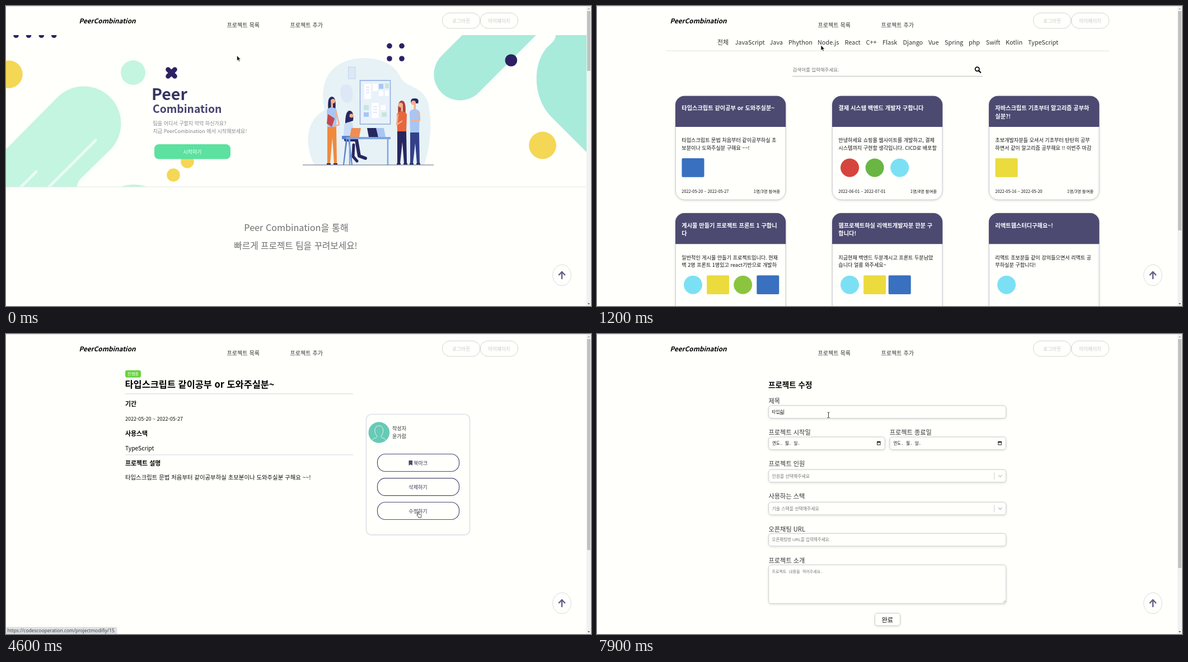
Recreate the animation shown at these times as an HTML page. Size 1045x536 px, loop 8 s.

```html
<!DOCTYPE html>
<html lang="ko">
<head>
<meta charset="utf-8">
<title>PeerCombination</title>
<style>
html, body { margin: 0; width: 100%; height: 100%; overflow: hidden; background: #fffffc; }
svg { display: block; width: 1045px; height: 536px; }
text { font-family: "Noto Sans CJK KR", "Noto Sans CJK JP", "Noto Sans CJK", sans-serif; white-space: pre; }
.field { font-family: "Liberation Sans", "Noto Sans CJK KR", sans-serif; }
.mono { font-family: "Liberation Mono", "Noto Sans CJK KR", monospace; }
.check { font-family: "DejaVu Sans", sans-serif; }
#status text { font-family: "Noto Sans", sans-serif; }
.logo { font-style: italic; font-weight: 700; }
.shadow { filter: drop-shadow(0 1px 2px #0002); }
</style>
</head>
<body>
<svg id="stage" viewBox="0 0 1045 536"></svg>
<script>
const NAVY = '#2d2163', INK = '#4d4a72', MINT = '#c3f5e1', TEAL = '#a8ebda', YELLOW = '#f5d756';
const BG = '#fffffc', DARK = '#27275f', BLUE = '#a9c6f2', SKIN = '#f5b08c';

const text = (x, y, size, str, fill = '#333', more = '') =>
  `<text x="${x}" y="${y}" font-size="${size}" fill="${fill}" ${more}>${str}</text>`;
const circle = (x, y, r, fill, more = '') => `<circle cx="${x}" cy="${y}" r="${r}" fill="${fill}" ${more}/>`;
const rect = (x, y, w, h, fill, more = '') =>
  `<rect x="${x}" y="${y}" width="${w}" height="${h}" fill="${fill}" ${more}/>`;
const path = (d, fill, more = '') => `<path d="${d}" fill="${fill}" ${more}/>`;
const line = (d, stroke, width = 1, more = '') =>
  path(d, 'none', `stroke="${stroke}" stroke-width="${width}" ${more}`);
const group = (id, ...parts) => `<g id="${id}">${parts.join('')}</g>`;
const BOLD = 'font-weight="700"', MEDIUM = 'font-weight="500"', MIDDLE = 'text-anchor="middle"';
const ROUND = 'stroke-linecap="round" stroke-linejoin="round"';

function navigation() {
  const pill = (x, label) => rect(x, 12.3, 67.5, 27.7, 'none', 'rx="13.8" stroke="#cfcfcf" stroke-width=".9"') +
    text(x + 33.8, 30, 8.6, label, '#c9c9c9', `${MIDDLE} ${MEDIUM}`);
  return text(130.5, 31, 11.7, 'PeerCombination', '#000', 'class="logo"') +
    text(394.5, 37.5, 10.1, '프로젝트 목록', '#333', 'id="listLink"') +
    text(507.5, 37.5, 10.1, '프로젝트 추가') + pill(779.3, '로그아웃') + pill(847.2, '마이페이지');
}

function illustration() {
  const note = (x, y, w, h, fill = '#fff') => rect(x, y, w, h, fill);
  // face: -1 looks left, 1 looks right
  const person = (x, y, face, hair, hairLength, top, legs, hip) =>
    path(`M${x - 6} ${y + hairLength}q-3-${hairLength + 6} 6-${hairLength + 6}t6 ${hairLength + 6}z`, hair) +
    rect(x - 1.5, y + 4, 3.5, 12, SKIN) + circle(x + face * 2, y + 2, 4, SKIN) +
    path(`M${x - 9} ${y + 19}q1-5 9-6q8 1 9 6l-1 ${hip - y - 19}h-16z`, top) +
    path(`M${x - 8} ${hip}h16l1 ${281 - hip}h-5l-3-${262 - hip}l-4 ${262 - hip}h-5z`, legs) +
    rect(x - 9, 281, 7, 2.5, DARK) + rect(x + 3, 281, 7, 2.5, DARK);
  return path('M551 284C533 250 534 205 569 186C561 150 568 110 612 97C650 86 692 98 704 126C712 146 742 141 754 172C762 210 758 250 747 284Z', '#e7f2f6') +
    rect(611.5, 109, 12.5, 21, '#dce8f5', 'stroke="#c2d4ee"') + path('M597 152q1-12 11-12t11 12q2 20-9 21t-13-21', '#dce8f5') +
    rect(632.5, 133, 54, 78, '#e9f1fb', 'stroke="#8cabe0" stroke-width="1.5"') +
    note(640, 139, 12, 27) + note(655, 139, 9, 13) + note(666, 139, 8, 9, BLUE) + note(677, 138, 7, 9, '#c3e8dc') +
    note(666, 151, 8, 10) + note(677, 151, 7, 10) + note(653, 173, 13, 27) + note(639, 177, 9, 9, '#c3e8dc') +
    note(669, 177, 9, 9) + note(639, 190, 9, 8, BLUE) + note(671, 190, 9, 8, '#c3e8dc') +
    line('M643 145h6m-6 5h6m-6 5h6m7 25h7m-7 5h7m-7 5h7', '#c3d3ea', 1) +
    person(582, 168, 1, DARK, 20, BLUE, '#f08a3c', 216) + path('M575 193l12 8l-5 15l-9-6z', '#c4484d') +
    line('M590 190l5 22l-9 3', SKIN, 2.5, ROUND) +
    path('M606 210q0-23 8-23q8 1 6 18z', DARK) + circle(617, 196, 3.5, SKIN) +
    path('M604 212q7-7 15-3l3 25h-19z', '#c9dcf7') + line('M607 239h19l5 29l11 4', DARK, 6, ROUND) +
    line('M621 248l-1 21l7 8', DARK, 5, ROUND) + path('M600 232h18v6h-18zM607 238h3l-6 46h-2zM611 238h3l5 46h-2z', '#5d82cf') +
    rect(608, 234, 79, 4, '#7fa4e3') + line('M614 238v46M682 238v46', '#7fa4e3', 2.5) +
    path('M617 218h17l-3 16h-17z', '#ee8e55') + path('M645 218h17l3 16h-17z', DARK) +
    path('M661 218h14l3 16h-13z', BLUE) +
    person(707, 175, -1, '#a9433c', 22, '#e8663e', DARK, 224) + person(730, 171, -1, DARK, 3, BLUE, '#33408a', 226) +
    line('M700 194l-2 18l9-6M738 190l1 14l-13 1', SKIN, 2.5, ROUND) + line('M530 284h234', '#666a80', 1.2);
}

function home() {
  const dots = (xs, y) => xs.map(x => circle(x, y, 4.8, NAVY)).join('');
  return `<clipPath id="heroClip">${rect(0, 52, 1037, 271, '#000')}</clipPath><g clip-path="url(#heroClip)">` +
    dots([18, 40.5, 63.3, 85.7], 52.3) + circle(5, 122, 24.7, YELLOW) + circle(227, 119, 22, MINT) +
    path('M0 256L92 163A66 66 0 0 1 186 257L136 306Q127 314 127 323H0Z', MINT) +
    line('M160 240L74 326M54 296L23 327', '#e8fcf4', 5, ROUND) + circle(228, 387, 68, MINT) +
    line('M289.5 113.5l12 12m0-12l-12 12', NAVY, 8.5, ROUND) +
    circle(324, 278, 11.8, YELLOW) + circle(299, 302, 11.8, YELLOW) +
    dots([685, 707], 71.3) + dots([685, 707], 94) +
    path('M815 52L778 89A46 46 0 0 0 844 155L947 52Z', TEAL) +
    path('M982 52C981 64 971 68 964 77C941 106 941 162 972 196L1037 261V52Z', TEAL) +
    circle(902.3, 97, 10.8, NAVY) + circle(958.5, 249, 24.4, YELLOW) + '</g>' +
    text(260, 168, 28.5, 'Peer', '#35335f', BOLD) + text(262, 191, 19.3, 'Combination', '#45426f', BOLD) +
    text(262.5, 213.3, 9.05, '팀을 어디서 구할지 막막 하신가요?', '#85858f') +
    text(262.5, 226.9, 9.05, '지금 PeerCombination 에서 시작해보세요!', '#85858f') +
    rect(265, 247, 136, 26.5, '#5ce1a0', 'rx="8"') + text(333, 263.8, 9, '시작하기', '#fff', MIDDLE) +
    illustration() + line('M0 323.2h1037', '#dfe5e3', .8) +
    text(518.5, 402, 16.2, 'Peer Combination을 통해', '#707070', `${MIDDLE} font-weight="300"`) +
    text(517.5, 434, 15.7, '빠르게 프로젝트 팀을 꾸려보세요!', '#707070', `${MIDDLE} font-weight="300"`);
}

function filters() {
  const names = { 전체: 215, JavaScript: 246.5, Java: 308.5, Phython: 342, 'Node.js': 394, React: 442.5, 'C++': 480.5,
    Flask: 510, Django: 546.5, Vue: 592, Spring: 621, php: 664, Swift: 694.7, Kotlin: 730, TypeScript: 770 };
  return Object.entries(names).map(([name, x]) => text(x, 69, 10.85, name)).join('') +
    line('M123 80.3h792', '#ebebe9', 1.4) +
    text(349.5, 117.4, 8.5, '검색어를 입력해주세요.', '#777') + line('M349 125.5h340', '#bbb') +
    circle(679.2, 112.8, 3.6, 'none', 'stroke="#000" stroke-width="1.8"') + line('M682 115.6l3.2 3.2', '#000', 2.2, ROUND);
}

const badges = {
  ts: ['#3970bf', true], js: ['#ecdb3d', true], java: ['#d5453d'], spring: ['#6ab644'], react: ['#7ce0f4'], node: ['#8bc53f']
};
const posts = [
  ['타입스크립트 같이공부 or 도와주실분~', '', '타입스크립트 문법 처음부터 같이공부하실 초', '보분이나 도와주실분 구해요 ~~!', 'ts', '2022-05-20 ~ 2022-05-27', '1명/3명'],
  ['결제 시스템 백엔드 개발자 구합니다', '', '안녕하세요 쇼핑몰 웹사이트를 개발하고, 결제', '시스템까지 구현할 생각입니다. CICD로 배포할', 'java spring react', '2022-06-01 ~ 2022-07-01', '1명/4명'],
  ['자바스크립트 기초부터 알고리즘 공부하', '실분?!', '초보개발자분들 오셔서 기초부터 탄탄히 공부', '하면서 같이 알고리즘 공부해요 !! 이번주 마감', 'js', '2022-05-16 ~ 2022-05-20', '1명/3명'],
  ['게시물 만들기 프로젝트 프론트 1 구합니', '다', '일반적인 게시물 만들기 프로젝트입니다. 현재', '백 2명 프론트 1명있고 react기반으로 개발하', 'react js node ts', '2022-05-20 ~ 2022-06-20', '3명/4명'],
  ['웹프로젝트하실 리액트개발자분 한분 구', '합니다!', '지금현재 백엔드 두분계시고 프론트 두분남았', '습니다 얼릉 와주세요~', 'react js ts', '2022-05-20 ~ 2022-06-20', '4명/5명'],
  ['리액트웹스터디구해요~!', '', '리액트 초보분들 같이 강의들으면서 리액트 공', '부하실분 구합니다!', 'react', '2022-05-20 ~ 2022-06-20', '1명/4명']
];

function card([title, title2, body, body2, stack, dates, members], i) {
  const icons = stack.split(' ').map((name, k) => {
    const [color, square] = badges[name], x = 11.5 + k * 44.6;
    return square ? rect(x, 111.3, 40, 33.7, color, 'rx="2"') : circle(x + 20, 128.2, 16.5, color);
  });
  return `<g transform="translate(${140 + i % 3 * 280} ${160.7 + Math.floor(i / 3) * 209.3})">` +
    rect(.3, .3, 196.6, 185.3, BG, 'rx="16" stroke="#c5c5cc" stroke-width=".9" class="shadow"') +
    path('M0 55.3V16a16 16 0 0 1 16-16h165.2a16 16 0 0 1 16 16v39.3z', INK) +
    text(11.3, 25.6, 10.2, title, '#fff', BOLD) + text(11.3, 40.4, 10.2, title2, '#fff', BOLD) +
    text(11.3, 82.8, 9.1, body, '#111') + text(11.3, 96.3, 9.1, body2, '#111') + icons.join('') +
    text(11.3, 173.3, 7.4, dates, '#111') +
    text(187, 173.3, 7.4, members + ' 참여중', '#111', 'text-anchor="end"') + '</g>';
}

function footer() {
  const head = (x, label) => text(x, 184.3, 11.4, label, '#222', MEDIUM);
  const item = (x, y, label) => text(x, y, 9.8, label);
  const check = y => text(691.5, y, 13, '✔', '#333', 'class="check"');
  return text(244, 225, 11.7, 'PeerCombination', '#000', 'class="logo"') +
    head(428, 'REFERENCE') + item(428, 211, 'Designed by') + item(428, 225.5, 'Drawpom') +
    head(560, 'ABOUT US') + item(560, 211, 'Repository') + item(560, 231, 'Wiki') +
    head(692, 'TEAM MEMBER') + check(212) + item(704, 211, 'Front') + item(691.7, 231, '최다온') +
    item(725.5, 231, '윤가람') + check(252.5) + item(704, 251.5, 'Back') + item(691.7, 271.7, '남도율');
}

function detail() {
  const button = (y, label, x = 736) => rect(663.5, y, 146, 31, 'none', `rx="14" stroke="${INK}" stroke-width="1.2"`) +
    text(x, y + 19, 9.1, label, '#3b3958', MIDDLE);
  return rect(213, 64.7, 28, 13, '#67d33f', 'rx="3.5"') + text(227, 74, 7.3, '진행중', '#fff', MIDDLE) +
    text(212.5, 96, 16.4, '타입스크립트 같이공부 or 도와주실분~', '#000', BOLD) +
    line('M213 106.8h407M213 215.8h407', '#dcdde6', 1.3) +
    text(213, 128.7, 10.9, '기간', '#000', BOLD) + text(213, 154.8, 9.05, '2022-05-20 ~ 2022-05-27', '#111') +
    text(213, 182.2, 10.9, '사용스택', '#000', BOLD) + text(213, 208, 10.3, 'TypeScript', '#000', MEDIUM) +
    text(213, 235, 10.9, '프로젝트 설명', '#000', BOLD) +
    text(213, 259.5, 10.4, '타입스크립트 문법 처음부터 같이공부하실 초보분이나 도와주실분 구해요 ~~!', '#111') +
    rect(643.5, 143.5, 185, 215.3, 'none', 'rx="9" stroke="#dfe0e9" stroke-width="1.7"') +
    circle(666.3, 176, 18.8, '#67cab5') +
    line('M655 190c0-5 8-3 8-8c-6-4-6-18 3.3-18s9 14 3.5 18c0 5 8 3 8 8', '#e4f6f1', 1) +
    text(690, 172, 9.05, '작성자') + text(690, 185.5, 9.05, '윤가람') +
    path('M719.5 226h6.5v9l-3.25-2l-3.25 2z', INK) +
    button(214.5, '북마크', 740.7) + button(257.7, '삭제하기') + button(300.5, '수정하기');
}

function form() {
  const label = (x, y, str) => text(x, y, 11.2, str);
  const box = (x, y, w, h = 22.5) => rect(x, y, w, h, BG, 'rx="4.5" stroke="#c9c9c9" stroke-width=".9" class="shadow"');
  const hint = (y, str, size = 7.5, cls = 'field') => text(312.5, y, size, str, '#777', `class="${cls}"`);
  const date = x => box(x, 184, 207.5) + text(x + 6.2, 198, 7.5, '연도.', '#111', 'class="mono"') +
    text(x + 29, 198, 7.5, '월.', '#111', 'class="mono"') + text(x + 44.7, 198, 7.5, '일.', '#111', 'class="mono"') +
    rect(x + 193.8, 192.3, 5.5, 5.7, 'none', 'stroke="#111" stroke-width=".9"') + rect(x + 193.5, 192, 6, 2, '#111');
  const select = (y, str) => box(306.7, y, 424) + hint(y + 14.5, str, 7.9) +
    line(`M709.7 ${y + 5}v13`, '#ccc') + line(`M717.2 ${y + 10}l3 3l3-3`, '#bbb', 1.2, ROUND);
  return text(306, 96, 13.5, '프로젝트 수정', '#000', BOLD) +
    label(306.5, 123.7, '제목') + box(306.7, 128, 424) + `<g id="title"></g>` +
    label(306.5, 179.8, '프로젝트 시작일') + date(306.7) + label(522.7, 179.8, '프로젝트 종료일') + date(523) +
    label(306.5, 236, '프로젝트 인원') + select(242.3, '인원을 선택해주세요') +
    label(306.5, 294.3, '사용하는 스택') + select(300.5, '기술 스택을 선택해주세요') +
    label(306.5, 352.5, '오픈채팅 URL') + box(306.7, 356.4, 424) + hint(370, '오픈채팅방 URL을 입력해주세요.') +
    label(306.5, 408.6, '프로젝트 소개') + box(306.7, 412.6, 424, 69) + hint(426.7, '프로젝트 내용을 적어주세요.', 7.1, 'mono') +
    line('M725.5 480l4-4m-1.5 4l1.5-1.5', '#777', .7) +
    box(496.5, 499, 45, 22) + text(518.8, 514.5, 11.2, '완료', '#111', `${MIDDLE} ${MEDIUM}`);
}

const scrollbar = rect(1037, 1, 8, 535, '#f1f1f1') + rect(1038, 9, 6, 1, '#c1c1c1', 'id="thumb"') +
  path('M1039 6h4l-2-2.5z', '#a3a3a3') + path('M1039 531h4l-2 2.5z', '#505050');

const cursors =
  group('arrow', path('M0 0v9.5l2.2-2l1.5 3.3l1.5-.7l-1.5-3.2h3z', '#111', 'stroke="#fff" stroke-width=".6"')) +
  group('hand', path('M2.5 6V1.2q1-1.2 1.8 0V4.5l4 .9q1 .3.8 1.5l-.6 2.6v1.3h-4.6v-1.2l-3.3-3.6q.4-1.1 1.9 0z', '#fff',
    'stroke="#222" stroke-width=".8" stroke-linejoin="round"')) +
  group('beam', line('M-2-4.7h1.5l.5.5l.5-.5h1.5M0-4.2v8.4M-2 4.7h1.5l.5-.5l.5.5h1.5', '#222', .9));

document.getElementById('stage').innerHTML = rect(0, 0, 1045, 536, BG) +
  group('home', home()) +
  group('list', filters(), group('cards', ...posts.map(card)), group('footer', footer())) +
  group('detail', detail()) + group('form', form()) + group('nav', navigation()) +
  group('up', `<ellipse cx="993" cy="481" rx="16.3" ry="18.7" fill="${BG}" stroke="#dadae2"/>`,
    line('M993 488v-13m-5.8 6l5.8-6l5.8 6', '#625f86', 2.4)) +
  group('scroll', scrollbar) + rect(0, 0, 1045, 1, '#dfe1df') +
  group('status', rect(-2, 524, 1, 14, '#dee1e3', 'rx="2" id="statusBox" stroke="#cfd2d4" stroke-width=".6"'),
    text(2.5, 533.2, 8.4, '', '#444', 'id="statusText"')) + group('cursor', cursors);

const $ = id => document.getElementById(id);
const show = (id, on) => { $(id).style.display = on ? '' : 'none'; };
const shift = (id, x, y = 0) => $(id).setAttribute('transform', `translate(${x} ${y})`);
const at = (steps, t) => steps.filter(step => step[0] <= t).pop();

// time, x, y, pointer
const route = [
  [0, 412.5, 88.5, 'arrow'], [200, 480, 79, 'arrow'], [300, 517, 64, 'arrow'], [400, 503, 53, 'arrow'], [500, 470, 45, 'arrow'],
  [600, 446, 36, 'hand'], [800, 427, 31.5, 'hand'], [1000, 427, 31.5, 'hand'], [1200, 400, 70, 'arrow'], [1500, 330, 165, 'arrow'],
  [1700, 298, 218, 'hand'], [1800, 294.5, 220.5, 'hand'], [1900, 291.5, 223, 'hand'], [2100, 291.5, 223, 'hand'],
  [2200, 291.5, 224.5, 'hand'], [2300, 294.5, 225, 'arrow'], [2400, 294.5, 225, 'arrow'], [2900, 712, 318, 'hand'],
  [3000, 718, 320.5, 'hand'], [3100, 718, 320.5, 'hand'], [3300, 752, 321.5, 'hand'], [3500, 744, 321, 'hand'],
  [4000, 744, 321, 'hand'], [4400, 732.8, 318, 'hand'], [4500, 732.8, 318, 'hand'], [4600, 733, 317.3, 'hand'],
  [4900, 733, 317.3, 'hand'], [5000, 715, 305, 'arrow'], [5600, 425, 150, 'beam'], [5700, 412, 144.5, 'beam'],
  [6100, 412, 144.5, 'beam'], [6200, 413.5, 144.7, 'beam'], [8000, 413.5, 144.7, 'beam']
];
const pages = [[0, 'home', 116], [1000, 'list', 401], [2500, 'detail', 386], [5000, 'form', 418]];
const links = [[0], [600, 'projectlist', 348], [1200], [1700, 'postdetail', 168], [2500],
  [4300, 'projectmodifiy/15', 198], [5000]];
const typing = [[0, ''], [6800, 'x'], [7000, ''], [7100, 'ㅌ'], [7200, '타'], [7400, '탕'], [7500, '타이'],
  [7600, '타입'], [7700, '타입스'], [7900, '타입슼']];

function drawTitle(t) {
  const typed = at(typing, t)[1];
  const caretOn = t >= 6000 && t < 6400 || t >= 6800;
  const content = typed ? typed.slice(0, -1) +
    `<tspan ${typed === 'x' ? '' : 'text-decoration="underline"'}>${typed.slice(-1)}</tspan>` : '제목을 입력해주세요.';
  $('title').innerHTML = text(312.5, 141.8, 7.5, content, typed ? '#111' : '#777', 'class="field"') +
    (caretOn ? rect(313 + typed.length * 6.8, 134.5, .7, 8.5, '#222') : '');
}

function drawCursor(t) {
  const i = route.findIndex(step => step[0] > t);
  const [t0, x0, y0, kind] = route[i - 1], [t1, x1, y1] = route[i];
  const k = (t - t0) / (t1 - t0);
  shift('cursor', x0 + (x1 - x0) * k, y0 + (y1 - y0) * k);
  for (const name of ['arrow', 'hand', 'beam']) show(name, name === kind);
}

function draw(now) {
  const t = Math.floor(now % 8000 / 100) * 100;
  const [, page, thumbEnd] = at(pages, t);
  const loading = t >= 1000 && t < 1200;
  for (const [, name] of pages) show(name, name === page);
  show('cards', !loading);
  show('footer', loading);
  show('scroll', !loading);
  for (const id of ['nav', 'list']) shift(id, loading ? 4 : 0);
  shift('up', loading ? 8 : 0);
  $('thumb').setAttribute('height', thumbEnd - 9);

  const [, link, width] = at(links, t);
  show('status', link);
  if (link) {
    $('statusBox').setAttribute('width', width + 2);
    $('statusText').textContent = 'https://codescooperation.com/' + link;
  }
  const hovering = link === 'projectlist';
  $('listLink').setAttribute('font-weight', hovering ? 700 : 400);
  $('listLink').setAttribute('fill', hovering ? '#000' : '#333');
  drawTitle(t);
  drawCursor(t);
  requestAnimationFrame(draw);
}
requestAnimationFrame(draw);
</script>
</body>
</html>
```
